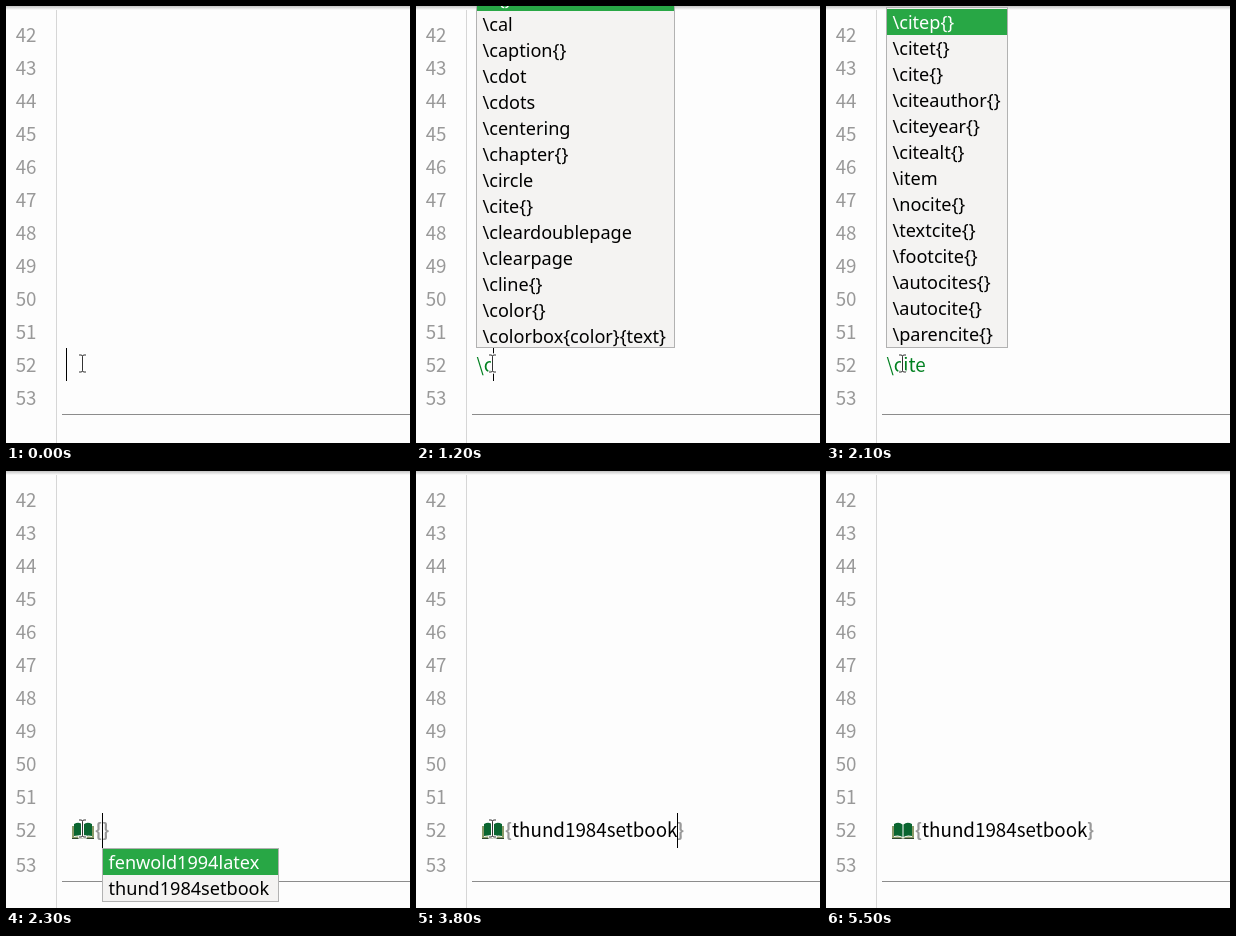
An HTML page for the animation above (5800 ms loop, 404x437 px).

```html
<!DOCTYPE html>
<html lang="en">
<head>
<meta charset="utf-8">
<title>Citation completion</title>
<style>
  html, body { margin: 0; width: 100%; height: 100%; overflow: hidden; background: #fdfdfd; }
  svg { display: block; }
  text { white-space: pre; }
  .code { font: 18.8px "Noto Sans CJK SC", "Noto Sans", sans-serif; }
  .number { fill: #999; text-anchor: end; }
  .command { fill: #008020; }
  .brace { fill: #999; font-weight: bold; }
  .item { font: 18.1px "Noto Sans", "Open Sans", sans-serif; }
</style>
</head>
<body>
<svg id="stage" width="404" height="437" viewBox="0 0 404 437">
  <defs>
    <linearGradient id="shade" x2="0" y2="1">
      <stop offset="0" stop-color="#c4c4c4"/>
      <stop offset="1" stop-color="#fdfdfd"/>
    </linearGradient>
  </defs>
  <rect width="404" height="437" fill="#fdfdfd"/>
  <rect x="50" width="1" height="437" fill="#d6d6d6"/>
  <g id="numbers"></g>
  <g id="below">
    <text class="code number" x="30.5" y="399">53</text>
    <rect x="56" y="408" width="348" height="1" fill="#8c8c8c"/>
  </g>
  <rect width="404" height="4" fill="url(#shade)"/>
  <g id="scene"></g>
  <g id="pointer" fill="none">
    <path id="beam" d="M-3.5 -8.5H-1Q.5 -8.5 .5 -7Q.5 -8.5 2 -8.5H4.5M.5 -7V7M-3.5 8.5H-1Q.5 8.5 .5 7Q.5 8.5 2 8.5H4.5" stroke="#fff" stroke-width="3"/>
    <use href="#beam" style="stroke:#333"/>
    <path d="M-3 -8.5H-1Q.5 -8.5 .5 -7Q.5 -8.5 2 -8.5H4M.5 -7V7M-3 8.5H-1Q.5 8.5 .5 7Q.5 8.5 2 8.5H4" stroke="#333"/>
  </g>
</svg>
<script>
const LOOP = 5800, ROW = 26;
const scene = document.getElementById("scene");
const below = document.getElementById("below");
const pointer = document.getElementById("pointer");
const timed = [];

function add(parent, tag, attrs, content = "") {
  const node = document.createElementNS("http://www.w3.org/2000/svg", tag);
  for (const key in attrs) node.setAttribute(key, attrs[key]);
  node.textContent = content;
  parent.append(node);
  return node;
}

// A group that is visible only from start to end.
function during(start, end) {
  const node = add(scene, "g", {});
  timed.push({ node, start, end });
  return node;
}

function code(parent, x, content, kind) {
  add(parent, "text", { class: "code " + kind, x, y: 366 }, content);
}

function popup(start, end, box, items, selected = 0, shift = 0) {
  const [x, y, width, height] = box;
  const group = during(start, end);
  add(group, "rect", { x: x + .5, y: y + .5, width: width - 1, height: height - 1, fill: "#f4f3f2", stroke: "#b2b2b2" });
  const list = add(group, "svg", { x: x + 1, y: y + 1, width: width - 2, height: height - 2, overflow: "hidden" });
  items.forEach((item, i) => {
    const top = i * ROW + shift;
    const chosen = i === selected;
    if (chosen) add(list, "rect", { y: top, width: width - 2, height: ROW, fill: "#28a745" });
    add(list, "text", { class: "item", x: 5.5, y: top + 19.5, fill: chosen ? "#fff" : "#000" }, item);
  });
}

function caret(start, end, x, height = 33) {
  add(during(start, end), "rect", { x, y: 342, width: 1, height, fill: "#000" });
}

function book(parent) {
  const shapes = [
    ["M66 355H68V366Q73 364.5 77 367Q81 364.5 86 366V355H88V367.5H66Z", "#8b9a68"],
    ["M68 353Q73 350.5 76.5 353.5V366Q73 363.5 68 365Z", "#0a6530"],
    ["M86 353Q81 350.5 77.5 353.5V366Q81 363.5 86 365Z", "#0a6530"],
    ["M66 367H75L77 368L79 367H88V368H66Z", "#30452f"]
  ];
  for (const [d, fill] of shapes) add(parent, "path", { d, fill });
}

for (let n = 41; n <= 52; n++) {
  add(document.getElementById("numbers"), "text", { class: "code number", x: 30.5, y: 3 + (n - 41) * 33 }, n);
}

// Typed command
const typed = [[700, 1100, "\\"], [1100, 1400, "\\c"], [1400, 1600, "\\ci"], [1600, 2300, "\\cite"]];
for (const [start, end, word] of typed) {
  code(during(start, end), 60.4, word, word.length > 1 ? "command" : "");
}

// Citation
const keys = ["fenwold1994latex", "thund1984setbook"];
const empty = during(2300, 3800);
book(empty);
code(empty, 89, "{", "brace");
code(empty, 96.3, "}", "brace");
const filled = during(3800, LOOP);
book(filled);
code(filled, 89, "{", "brace");
code(filled, 96, keys[1], "");
code(filled, 261, "}", "brace");

// Completion lists
const commands = names => names.split(" ").map(name => "\\" + name.replace("~", " "));
popup(700, 1100, [60, -23, 360, 365],
  commands("abovecaptionskip abstractname{} addbibresource{} addcontentsline{file}{sec_unit}{entry} address{Return~address} addtocontents{file}{text} addtocounter{counter}{value} addtolength{len-cmd}{len} addvspace alph{} Alph{} alpha appendix approx"), 0, 1);
popup(1200, 1400, [60, -23, 199, 365],
  commands("c{} cal caption{} cdot cdots centering chapter{} circle cite{} cleardoublepage clearpage cline{} color{} colorbox{color}{text}"), 0, 1);
popup(1400, 1600, [60, 131, 122, 211],
  commands("circle circle* cite{} citep{} citet{} citeauthor{} citeyear{} citealt{}"), 0, 1);
popup(1600, 2300, [60, 1, 122, 341],
  commands("citep{} citet{} cite{} citeauthor{} citeyear{} citealt{} item nocite{} textcite{} footcite{} autocites{} autocite{} parencite{}"), 0, 1);
popup(2300, 3400, [96, 377, 177, 54], keys);
popup(3400, 3800, [96, 377, 177, 54], keys, 1);

caret(0, 200, 60);
caret(700, 1100, 68);
caret(1100, 1400, 77);
caret(1400, 1600, 82);
caret(1600, 2100, 100);
for (const [start, end, x] of [[2300, 2700, 96], [3300, 3800, 96], [3800, 4400, 261], [4900, 5500, 261]]) {
  caret(start, end, x, 35);
}

// Pointer leaves upwards in steps of 100 ms.
const path = [[75, 345], [66, 290], [56, 215], [50, 140], [51, 70], [55, 20]];

function draw(now) {
  const t = now % LOOP;
  for (const { node, start, end } of timed) {
    node.style.display = t >= start && t < end ? "" : "none";
  }
  below.setAttribute("transform", `translate(0 ${t >= 2300 ? 2 : 0})`);
  const [x, y] = t < 4900 ? [76, 357.5] : path[Math.min(5, Math.floor((t - 4900) / 100))];
  pointer.setAttribute("transform", `translate(${x} ${y})`);
  pointer.style.display = t < 5500 ? "" : "none";
}

const began = performance.now();
function tick() {
  draw(performance.now() - began);
  requestAnimationFrame(tick);
}
tick();
</script>
</body>
</html>
```
